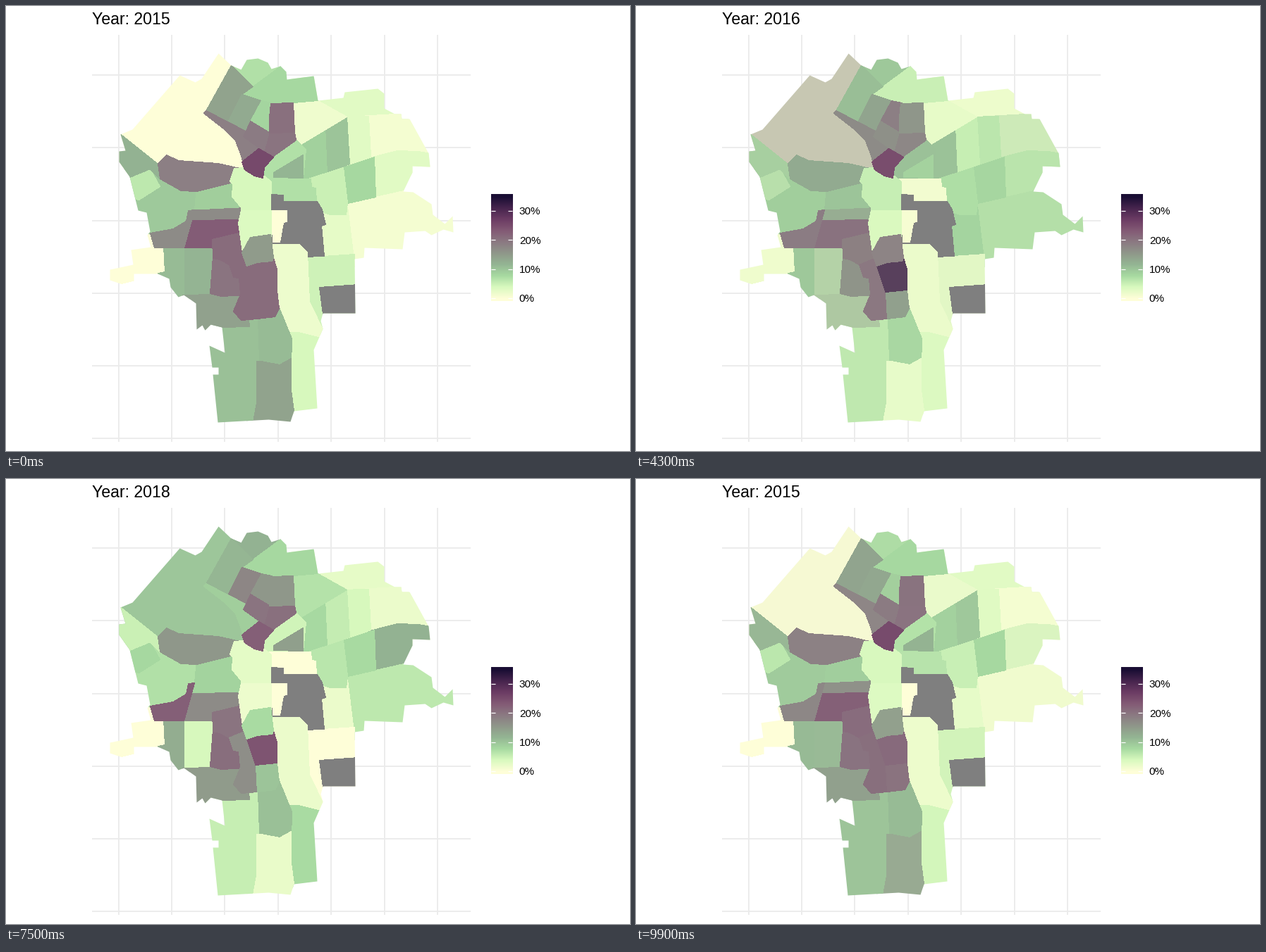
These frames come from a looping animation (885x632 px, 10 s). A matplotlib script:

```python
import numpy as np
import matplotlib.pyplot as plt
from matplotlib.animation import FuncAnimation
from matplotlib.collections import PolyCollection
from matplotlib.colors import LinearSegmentedColormap, to_rgb
from matplotlib.patches import Polygon

W, H, DPI = 885, 632, 100
PX = 72 / DPI
FRAMES, INTERVAL = 100, 100
FIRST_YEAR, YEARS = 2015, 4
MAX_RATE = 34.8
NA = np.nan

CMAP = LinearSegmentedColormap.from_list("rate", [
    "#FEFED8", "#D8F9BE", "#A7DAA1", "#94B593", "#8F978A",
    "#8B7982", "#835A75", "#6C3C64", "#47254E", "#1A0E34"], N=1024)
CMAP.set_bad("#7F7F7F")


def colour(rate):
    return CMAP(np.ma.masked_invalid(np.divide(rate, MAX_RATE)))[..., :3]


# CIE Lab, the space in which colours are blended
TO_XYZ = np.array([[0.4124, 0.3576, 0.1805],
                   [0.2126, 0.7152, 0.0722],
                   [0.0193, 0.1192, 0.9505]])
WHITE = TO_XYZ.sum(axis=1)
TO_LAB = np.array([[0, 116, 0], [500, -500, 0], [0, 200, -200]])


def rgb_to_lab(rgb):
    linear = np.where(rgb > 0.04045, ((rgb + 0.055) / 1.055) ** 2.4, rgb / 12.92)
    return np.cbrt(linear @ TO_XYZ.T / WHITE) @ TO_LAB.T


def lab_to_rgb(lab):
    xyz = (lab @ np.linalg.inv(TO_LAB).T) ** 3 * WHITE
    linear = np.clip(xyz @ np.linalg.inv(TO_XYZ).T, 0, 1)
    return np.clip(np.where(linear > 0.0031308,
                            1.055 * linear ** (1 / 2.4) - 0.055,
                            12.92 * linear), 0, 1)


# City limits, clockwise from the north-west corner
NORTH = [(162, 182), (179, 175), (246, 98), (268, 108), (277, 103), (301, 67),
         (319, 84), (333, 90), (341, 76), (357, 74), (371, 80), (376, 89),
         (389, 85), (397, 93), (398, 104), (436, 99), (442, 134), (478, 130),
         (480, 122), (527, 117), (536, 124), (536, 145), (551, 153)]
EAST = [(560, 153), (561, 160), (572, 160), (599, 209), (601, 228), (576, 227),
        (576, 236), (563, 263), (577, 264), (603, 281), (605, 296), (622, 309),
        (633, 298), (634, 321), (620, 317), (603, 325), (594, 319), (565, 321),
        (562, 345), (508, 343), (507, 357), (494, 359), (495, 436), (449, 436)]
SOUTH = [(446, 447), (449, 458), (436, 488), (441, 571), (408, 575), (403, 590),
         (372, 587), (300, 591), (293, 523), (301, 523), (301, 513), (292, 513),
         (288, 482), (310, 492), (306, 456), (290, 452), (282, 460), (278, 453),
         (270, 459), (269, 422), (252, 410), (244, 413)]
WEST = [(233, 399), (231, 387), (215, 380), (181, 380), (181, 392), (165, 395),
        (147, 389), (147, 374), (180, 367), (177, 346), (205, 342), (200, 325),
        (204, 320), (199, 293), (187, 290), (175, 242), (160, 221), (160, 206),
        (169, 205)]

shapes, rates = [], []


def district(yearly, *corners):
    """Paint over earlier districts; later ones and the city limits trim it,
    so every inner border is given only once."""
    rates.append(yearly)
    shapes.append(corners)


# North-east
district((0, 0, NA, 9.8), (150, 50), (330, 50), (340, 240), (150, 240))
district((3, 2, 1.5, 2.5), (400, 100), (570, 100), (570, 170), (400, 170))
district((1, 2, 8.5, 2), (500, 156), (551, 153), (610, 150), (610, 240), (500, 240))
district((3, 5, 8.3, 12), (500, 219), (555, 205), (584, 206), (620, 212),
         (620, 250), (564, 262), (500, 276))
district((1, 8.7, 4.7, 6), (480, 281), (564, 262), (640, 250), (640, 370), (480, 370))
district((3, 5, 8, 4), (470, 157), (514, 156), (517, 214), (470, 233))
district((10, 5.5, 5, 5.5), (440, 180), (483, 157), (487, 224), (440, 244))
district((8, 7.5, 9, 7.7), (478, 229), (522, 214), (524, 271), (484, 280))
district((8.7, 9, 12, 7.8), (410, 180), (452, 170), (455, 238), (410, 250))
district((1.5, 3, 1.5, 6.7), (400, 130), (442, 134), (483, 157), (418, 196), (400, 196))
district((2.5, 8.8, 7.8, 2), (440, 290), (484, 285), (493, 358), (440, 358))
district((5, 7, 7.5, 6.3), (425, 246), (478, 229), (484, 279), (482, 296),
         (459, 296), (430, 285))
district((4.7, 4.7, 0, 0), (420, 357), (494, 352), (500, 460), (420, 470))
district((NA, NA, NA, NA), (444, 399), (500, 395), (500, 440), (449, 437))

# North
district((18.5, 17, 17, 9), (280, 152), (290, 140), (340, 160), (370, 205),
         (338, 231), (333, 212), (325, 191), (311, 176))
district((7, 10, 9, 12), (319, 84), (319, 60), (389, 60), (389, 85), (350, 114))
district((8, 6, 3.7, 8), (350, 114), (389, 85), (450, 80), (442, 134), (407, 137),
         (370, 140), (335, 125))
district((14, 11.5, 9.5, 11.5), (319, 84), (350, 114), (334, 125), (315, 163), (284, 147))
district((13, 15, 12, 17.7), (334, 125), (362, 134), (340, 176), (315, 163))
district((7, 0, 3, 0), (360, 245), (432, 245), (433, 257), (439, 258), (440, 280),
         (360, 280))
district((7, 12, 8, 4.5), (360, 244), (368, 212), (411, 190), (425, 203), (421, 244))
district((11.6, 9.3, 7.5, 14.5), (379, 236), (421, 211), (421, 244), (379, 243))
district((20, 18, 17, 20.5), (365, 180), (409, 179), (411, 190), (379, 213), (362, 203))
district((19, 16, 17, 20), (336, 185), (347, 162), (373, 178), (366, 204), (361, 203))
district((8.3, 18.6, 18.5, 15.5), (362, 134), (377, 137), (377, 180), (347, 162))
district((20.5, 14, 18, 15.5), (375, 138), (407, 137), (409, 179), (373, 180), (373, 158))

# West
district((0, 2.7, 0, 0), (140, 320), (205, 320), (210, 343), (223, 343), (225, 378),
         (140, 400))
district((11, 10.5, 8.5, 12.7), (223, 340), (260, 340), (260, 420), (231, 420),
         (215, 379), (225, 377))
district((11.7, 11.4, 3, 4), (253, 341), (293, 341), (289, 395), (290, 412), (253, 412))
district((9.5, 9, 9, 7), (160, 230), (280, 250), (267, 290), (258, 290), (255, 305),
         (237, 316), (190, 325))
district((9, 10, 10, 8.5), (270, 255), (330, 240), (340, 290), (267, 290))
district((17, 16, 8.6, 8.5), (258, 290), (340, 286), (340, 310), (258, 310))
district((23, 21, 19, 17), (263, 304), (328, 303), (335, 323), (292, 333), (293, 343),
         (250, 343))
district((17, 18.5, 19.5, 22.5), (258, 290), (267, 289), (263, 304), (252, 343),
         (210, 343), (204, 322), (237, 316), (255, 305))
district((6, 4.8, 9.8, 8), (170, 243), (204, 231), (218, 256), (188, 275), (170, 270))
district((12, 10.5, 6.3, 5), (150, 172), (215, 224), (218, 246), (204, 231),
         (175, 243), (150, 240))
district((18.5, 13.7, 12, 15.5), (227, 211), (244, 219), (300, 223), (340, 232),
         (318, 251), (270, 263), (248, 262), (218, 245), (215, 224))

# Centre
district((4, 4.3, 6.6, 2.7), (323, 230), (350, 228), (376, 249), (376, 300),
         (333, 300), (333, 286), (320, 270), (321, 253), (317, 248))
district((25.4, 25, 24.8, 22.5), (358, 202), (379, 214), (366, 229), (364, 244),
         (352, 241), (338, 232), (334, 221))
district((NA, NA, NA, NA), (376, 267), (393, 268), (393, 277), (441, 277), (448, 289),
         (453, 310), (447, 312), (451, 355), (420, 356), (375, 340))
district((0, 0, 2, 0), (376, 290), (398, 290), (398, 306), (393, 307), (388, 335),
         (378, 335))

# South
district((1.7, 2.5, 1.2, 2), (370, 338), (416, 338), (427, 350), (430, 420),
         (452, 465), (443, 470), (402, 463), (370, 420))
district((4, 4, 2.6, 7.6), (402, 463), (414, 463), (450, 472), (450, 580), (400, 580))
district((11, 9, 6.6, 10.5), (350, 440), (387, 428), (405, 472), (404, 510), (350, 510))
district((14, 2.4, 2.2, 2.2), (350, 502), (388, 509), (404, 500), (404, 545),
         (408, 575), (400, 600), (340, 600))
district((10.5, 7.5, 3.4, 5.3), (280, 450), (356, 444), (358, 503), (354, 503),
         (354, 562), (348, 595), (280, 600))
district((14.2, 13.4, 4, 15), (250, 410), (340, 408), (345, 455), (306, 456), (250, 470))
district((20, 14.7, 17.6, 20.7), (293, 355), (320, 360), (340, 410), (305, 412), (289, 408))
district((21, 15, 23, 20), (292, 331), (330, 322), (345, 345), (340, 365), (316, 367),
         (303, 360), (293, 358))
district((21, 19, 20, 16.6), (316, 367), (345, 355), (360, 407), (356, 444),
         (333, 446), (322, 433), (332, 409), (330, 386), (322, 385))
district((21, 21.5, MAX_RATE, 24), (341, 369), (379, 357), (384, 374), (384, 404), (354, 407))
district((21, 13.7, 15, 10), (354, 407), (384, 404), (387, 429), (381, 441), (356, 444))
district((3.5, 3.5, 4, 1.7), (333, 290), (376, 290), (376, 330), (335, 350), (329, 308))
district((15, 17, 19.3, 7.6), (346, 328), (375, 324), (379, 357), (377, 362),
         (355, 364), (341, 369), (334, 350))

year_lab = rgb_to_lab(colour(rates))

fig = plt.figure(figsize=(W / DPI, H / DPI), dpi=DPI, facecolor="white")
ax = fig.add_axes([0, 0, 1, 1])

# Background grid
GRID = dict(colors="#EBEBEB", linewidths=1.85 * PX, zorder=0)
ax.vlines(159 + 75.45 * np.arange(7), 40, 618, **GRID)
ax.hlines(97.7 + 103.2 * np.arange(6), 121.5, 658, **GRID)

districts = PolyCollection(shapes, antialiaseds=False, linewidths=0, zorder=1)
ax.add_collection(districts)
districts.set_clip_path(Polygon(NORTH + EAST + SOUTH + WEST, transform=ax.transData))

# Legend
ZERO_Y, PX_PER_PERCENT = 414.5, 4.135
bar_rate = np.clip((ZERO_Y - np.arange(267, 419)) / PX_PER_PERCENT, 0, MAX_RATE)
ax.imshow(colour(bar_rate)[:, None], extent=(687, 717.5, 418.7, 266.7),
          aspect="auto", interpolation="nearest")
LABEL = dict(family="Liberation Sans", va="baseline")
for percent in range(0, 40, 10):
    y = ZERO_Y - percent * PX_PER_PERCENT
    ax.hlines([y, y], [687, 711.5], [693, 717.5], colors="white",
              linewidths=1.2 * PX, zorder=3)
    ax.text(727.3, y + 5.5, f"{percent}%", size=15.3 * PX, **LABEL)

title = ax.text(121, 26, "", size=23.1 * PX, **LABEL)
# Whole coordinates are pixel centres
ax.set(xlim=(-0.5, W - 0.5), ylim=(H - 0.5, -0.5))
ax.axis("off")

# Each year holds for half of its share of the loop, then blends into the next
KEY_FRAMES = np.round(np.linspace(0, FRAMES, 2 * YEARS + 1))
KEY_STATES = np.arange(2 * YEARS + 1) // 2
TITLE_SWITCH = 0.55


def update(frame):
    state = np.interp(frame, KEY_FRAMES, KEY_STATES)
    now, blend = int(state), state % 1
    start, end = year_lab[:, now], year_lab[:, (now + 1) % YEARS]
    districts.set_facecolor(lab_to_rgb(start + (end - start) * blend))
    title.set_text(f"Year: {FIRST_YEAR + (now + (blend > TITLE_SWITCH)) % YEARS}")
    return districts, title


anim = FuncAnimation(fig, update, frames=FRAMES, interval=INTERVAL,
                     repeat=True, repeat_delay=0)
plt.show()
```
